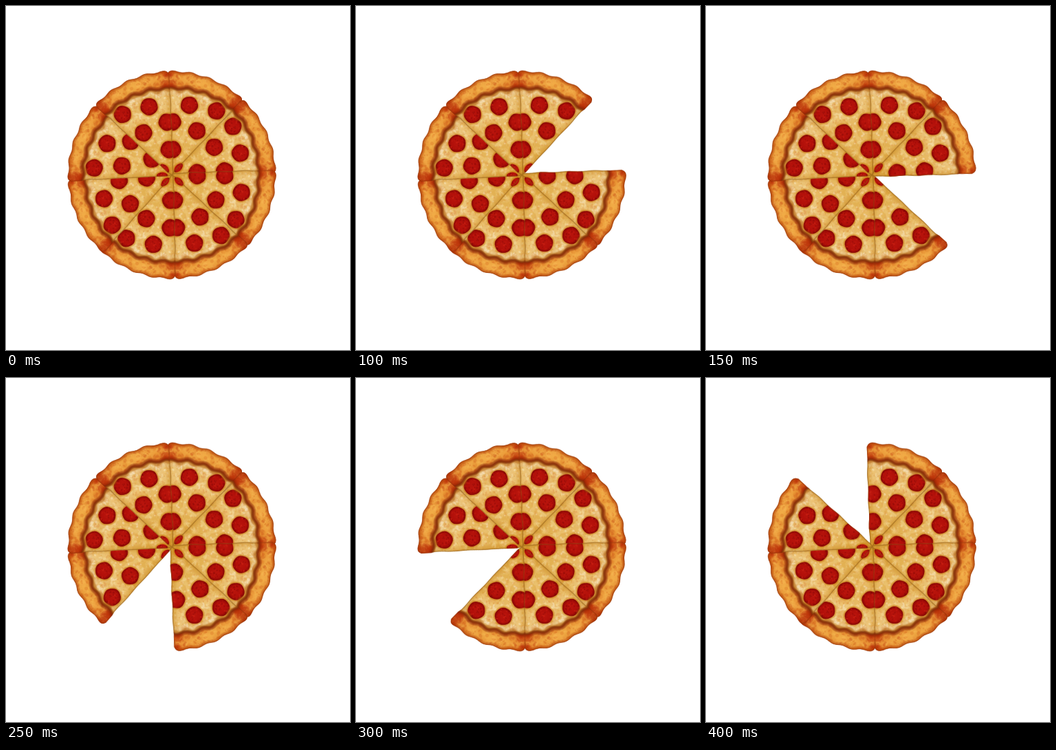
Animation of 500 by 500 pixels, one loop 0.45 s. Source, as an HTML page with a canvas:

```html
<!DOCTYPE html>
<html lang="en">
<head>
<meta charset="utf-8">
<title>Pizza</title>
<style>
html, body { margin: 0; width: 100%; height: 100%; overflow: hidden; background: #fff; }
canvas { display: block; width: 500px; height: 500px; }
</style>
</head>
<body>
<canvas id="stage" width="500" height="500"></canvas>
<script>
const STEP = 50, LOOP = 450;
const CX = 241, CY = 245.5;
const RES = 2, OX = 20, OY = 165, W = 150, H = 180;
const A0 = -2.9, A1 = 43.8, MID = (A0 + A1) / 2;

// Clockwise from the top: [rotation in degrees, mirrored]
const SLICES = [
  [0, 0], [86.5, 1], [90, 0], [175.8, 1],
  [180.7, 0], [264.8, 1], [310, 1], [355.7, 1]
];

const PEPPERONI = [[25.5, -101.3], [64.8, -93], [36.5, -64], [1, -77], [1, -37]];

let seed = 11;
function rnd() {
  seed = (seed * 1664525 + 1013904223) % 4294967296;
  return seed / 4294967296;
}
const range = (a, b) => a + (b - a) * rnd();
const rad = deg => deg * Math.PI / 180;
const polar = (a, r) => [r * Math.sin(rad(a)), -r * Math.cos(rad(a))];

const outer = a => 150.8 + 1.1 * Math.sin(a * 0.6 + 1.5)
  - 5 * Math.pow(Math.abs(a - MID) / (A1 - MID), 26);
const inner = a => 126 + a * 0.09 + 1.6 * Math.sin(a * 0.55 + 2);
const cheeseRim = a => inner(a) - 3 + 1.2 * Math.sin(a * 0.8);

function curve(path, radius, from, to) {
  for (let i = 0; i <= 60; i++) {
    const a = from + (to - from) * i / 60;
    path.lineTo(...polar(a, radius(a)));
  }
}

function wedgePath() {
  const p = new Path2D();
  p.moveTo(-1, 1);
  for (let r = 4; r < 126; r += 6) {
    p.lineTo(-2.8 - r * 0.034 + 0.5 * Math.sin(r / 6), -r);
  }
  curve(p, a => inner(a) + 2, A0, A1);
  for (let r = 126; r > 4; r -= 6) {
    const [x, y] = polar(42.8 + 0.25 * Math.sin(r / 7), r);
    p.lineTo(x + 1.1, y + 1.1);
  }
  p.closePath();
  return p;
}

function crustPath() {
  const p = new Path2D();
  curve(p, outer, A0, A1);
  curve(p, inner, A1, A0);
  p.closePath();
  return p;
}

function linePath(radius) {
  const p = new Path2D();
  curve(p, radius, A0 - 1, A1 + 1);
  return p;
}

// Stacked strokes make a soft edge.
function soft(g, path, color, width, alpha) {
  g.strokeStyle = color;
  g.globalAlpha = alpha / 4;
  for (let i = 1; i <= 4; i++) {
    g.lineWidth = width * i / 4;
    g.stroke(path);
  }
  g.globalAlpha = 1;
}

function blob(g, x, y, size, color, alpha) {
  g.globalAlpha = alpha;
  g.fillStyle = color;
  g.beginPath();
  g.ellipse(x, y, size, size * range(0.5, 1), range(0, 3), 0, 7);
  g.fill();
  g.globalAlpha = 1;
}

function speckle(g, count, rMin, rMax, sizes, colors, alpha) {
  for (let i = 0; i < count; i++) {
    const r = Math.sqrt(range(rMin * rMin, rMax * rMax));
    const [x, y] = polar(range(A0 - 1, A1 + 1), r);
    blob(g, x, y, range(...sizes), colors[Math.floor(rnd() * colors.length)], alpha);
  }
}

function pepperoni(g, x, y, rx = 12.6, ry = rx, turn = 0) {
  g.save();
  g.translate(x, y);
  g.rotate(turn);
  const disc = new Path2D();
  for (let t = 0; t < 6.28; t += 0.2) {
    const k = 1 + 0.02 * Math.sin(5 * t + x);
    disc.lineTo(rx * k * Math.cos(t), ry * k * Math.sin(t));
  }
  disc.closePath();
  soft(g, disc, "#c8780f", 5, 0.9);
  const fill = g.createRadialGradient(-1, -1, 1, 0, 0, rx);
  fill.addColorStop(0, "#b8140c");
  fill.addColorStop(0.65, "#b00f09");
  fill.addColorStop(1, "#840604");
  g.fillStyle = fill;
  g.fill(disc);
  g.clip(disc);
  for (let i = 0; i < 60; i++) {
    blob(g, range(-rx, rx), range(-ry, ry), range(0.6, 1.7),
      ["#d62a18", "#720403", "#c41c10"][i % 3], 0.35);
  }
  g.restore();
}

function drawCheese(g) {
  const wedge = wedgePath();
  g.save();
  g.clip(wedge);
  const fill = g.createRadialGradient(0, 0, 0, 0, 0, 130);
  fill.addColorStop(0, "#d79c38");
  fill.addColorStop(0.3, "#e2b255");
  fill.addColorStop(0.6, "#e8be6c");
  fill.addColorStop(0.92, "#eac580");
  fill.addColorStop(1, "#d99a42");
  g.fillStyle = fill;
  g.fill(wedge);
  speckle(g, 160, 15, 122, [3, 7], ["#f4dc9c", "#dc9f3a", "#eebf68"], 0.2);
  speckle(g, 420, 5, 124, [0.9, 2.6], ["#f8e6b4", "#d89a38", "#f0cc7c", "#e4a85e"], 0.36);
  speckle(g, 130, 50, 118, [0.8, 2], ["#f3dcc4", "#dc8c48", "#f7ead0"], 0.4);
  soft(g, linePath(a => cheeseRim(a) - 3), "#f0d8b4", 7, 0.55);
  speckle(g, 60, 114, 122, [1, 2.5], ["#f8e8cc", "#e4b880", "#e0a050"], 0.45);
  soft(g, wedge, "#c4841c", 15, 0.55);
  for (const [x, y] of PEPPERONI) pepperoni(g, x, y);
  pepperoni(g, 10, -10, 8, 5, rad(-47));
  soft(g, wedge, "#7c4a14", 3.2, 0.7);
  soft(g, linePath(cheeseRim), "#b06018", 5, 0.65);
  soft(g, linePath(a => inner(a) - 0.3), "#7a2606", 5, 1.3);
  g.restore();
}

function drawCrust(g) {
  const crust = crustPath();
  g.save();
  g.clip(crust);
  const fill = g.createLinearGradient(-8, -148, 104, -107);
  fill.addColorStop(0, "#c84a10");
  fill.addColorStop(0.16, "#e08026");
  fill.addColorStop(0.4, "#e89c3a");
  fill.addColorStop(0.7, "#e49234");
  fill.addColorStop(0.88, "#d0601a");
  fill.addColorStop(1, "#a82808");
  g.fillStyle = fill;
  g.fill(crust);
  soft(g, linePath(a => 140 + 1.5 * Math.sin(a / 2)), "#f6b853", 13, 0.6);
  speckle(g, 60, 129, 148, [3, 6], ["#f2b04c", "#d06018", "#eca040"], 0.2);
  speckle(g, 150, 129, 149, [1, 3], ["#f6bc5c", "#cf5c18", "#e9a048", "#c04410"], 0.26);
  soft(g, linePath(outer), "#b03c08", 9, 0.85);
  soft(g, linePath(inner), "#7c1c04", 9, 1.1);
  for (const [a, r, s] of [[0, 132, 6], [41, 136, 8], [42, 143, 7], [-1, 145, 4]]) {
    const [x, y] = polar(a, r);
    for (let i = 1; i <= 4; i++) blob(g, x, y, s * i / 3, "#b01c04", 0.18);
  }
  soft(g, crust, "#80280a", 3, 0.6);
  g.restore();
}

function makeSlice() {
  const c = document.createElement("canvas");
  c.width = W * RES;
  c.height = H * RES;
  const g = c.getContext("2d");
  g.scale(RES, RES);
  g.translate(OX, OY);
  g.lineJoin = "round";
  drawCheese(g);
  drawCrust(g);
  return c;
}

const slice = makeSlice();
const ctx = document.getElementById("stage").getContext("2d");
ctx.imageSmoothingQuality = "high";

function draw(time) {
  const missing = Math.floor(time % LOOP / STEP) - 1;
  ctx.fillStyle = "#fff";
  ctx.fillRect(0, 0, 500, 500);
  SLICES.forEach(([turn, mirrored], i) => {
    if (i === missing) return;
    ctx.save();
    ctx.translate(CX, CY);
    ctx.rotate(rad(turn));
    if (mirrored) ctx.scale(-1, 1);
    ctx.drawImage(slice, -OX, -OY, W, H);
    ctx.restore();
  });
}

const start = performance.now();
function tick() {
  draw(performance.now() - start);
  requestAnimationFrame(tick);
}
tick();
</script>
</body>
</html>
```
